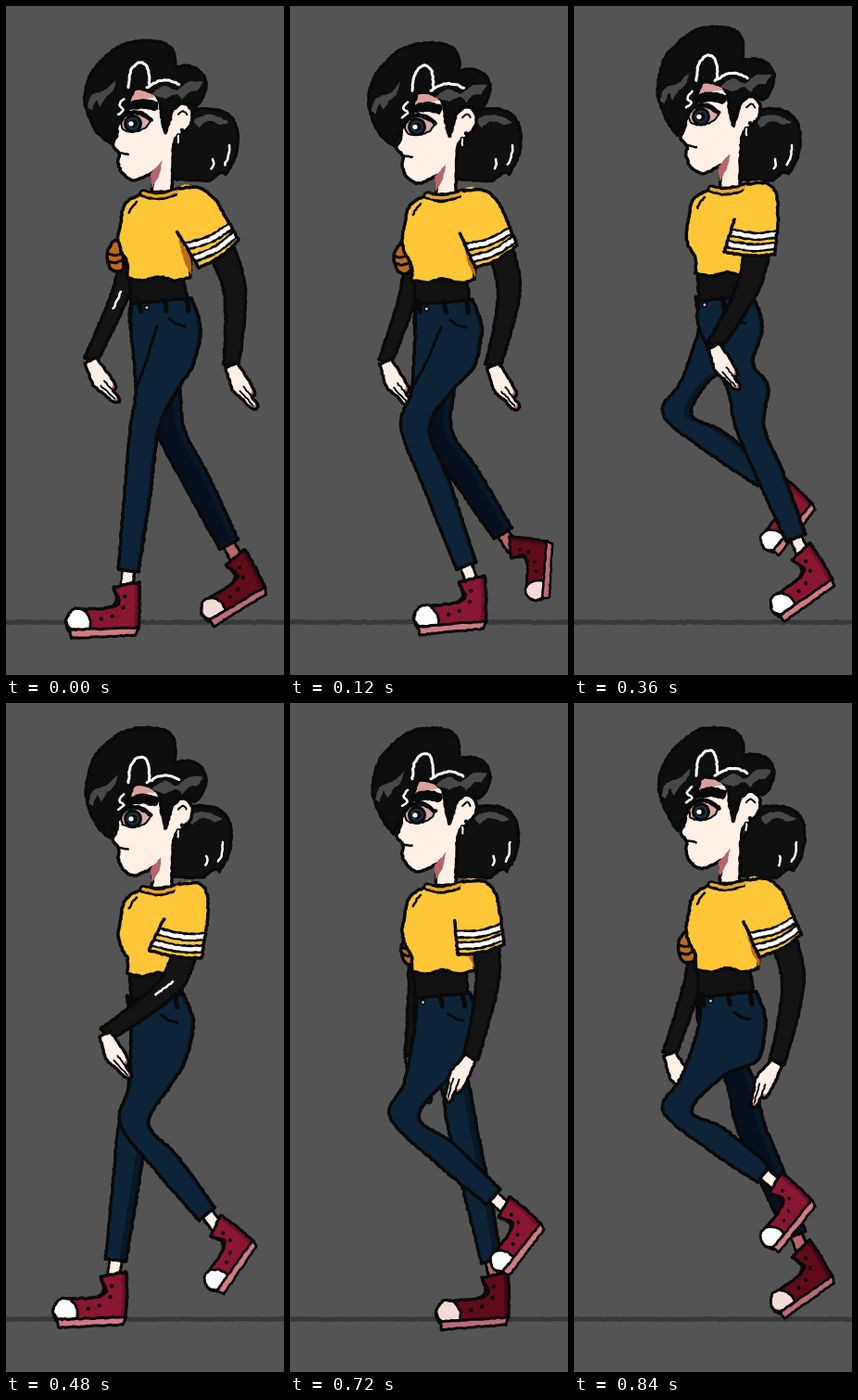
Recreate the animation shown at these times as an HTML page with a canvas. Size 300 px wide and 721 px high, loop 0.96 s.

```html
<!DOCTYPE html>
<html lang="en">
<head>
<meta charset="utf-8">
<title>Walk cycle</title>
<style>
html, body { margin: 0; width: 100%; height: 100%; overflow: hidden; background: #545454; }
canvas { display: block; }
</style>
</head>
<body>
<canvas id="stage" width="300" height="721"></canvas>
<script>
const ctx = document.getElementById('stage').getContext('2d');
const STEP = 120, POSES = 8;
const INK = '#0a0a0a', SKIN = '#fff0e6', PINK = '#b5656b', SHIRT = '#ffc638', RUST = '#bd6a1b', SLEEVE = '#141414';
const JEANS = '#0d2438', JEANS_SHADE = '#081827', JEANS_FAR = '#07101e';
const RED = '#8a1732', RED_SHADE = '#6a1028', RED_FAR = '#5f0b1a', GREY = '#484848';

// One stride, as heel x, heel y, shoe pitch in degrees, knee x.
const stride = [
  [140, 679, -1, 150], [209, 672, -4, 136], [233, 671, -3, 186], [281, 626, -34, 190],
  [271, 586, -54, 139], [256, 577, -50, 124], [275, 568, -51, 124], [261, 543, -50, 112]
];
// The far leg is half a stride behind, reaches further and drags a little.
const farStride = { ...stride, 0: [126, 671, -1, 138], 4: [281, 635, -30, 178], 5: [284, 580, -85, 160] };

let seed = 1;
function noise() {
  seed = (seed * 16807) % 2147483647;
  return seed / 2147483647 - .5;
}

const mix = (a, b, t) => [a[0] + (b[0] - a[0]) * t, a[1] + (b[1] - a[1]) * t];
const hard = ([x, y]) => [x, y, true];
const unit = (a, b) => {
  const d = Math.hypot(b[0] - a[0], b[1] - a[1]);
  return [(b[0] - a[0]) / d, (b[1] - a[1]) / d];
};

// "x,y x,y!" where "!" marks a hard corner.
function parse(text) {
  return text.split(' ').map(t => [...t.split(',').map(parseFloat), t.endsWith('!')]);
}

// Smooth path through the points, with a slightly ragged pen edge.
function curve(source, closed = true) {
  const pts = typeof source === 'string' ? parse(source) : source;
  const n = pts.length, path = new Path2D();
  const at = i => closed ? pts[(i + n) % n] : pts[Math.max(0, Math.min(n - 1, i))];
  const handle = (p, a, b) => p[2] ? p : [p[0] + (b[0] - a[0]) / 6, p[1] + (b[1] - a[1]) / 6];
  path.moveTo(pts[0][0], pts[0][1]);
  for (let i = 0; i < (closed ? n : n - 1); i++) {
    const p = at(i), q = at(i + 1);
    const c = handle(p, at(i - 1), q), d = handle(q, at(i + 2), p);
    const steps = Math.max(1, Math.round(Math.hypot(q[0] - p[0], q[1] - p[1]) / 2.2));
    for (let k = 1; k <= steps; k++) {
      const t = k / steps, u = 1 - t;
      const on = a => u * u * u * p[a] + 3 * u * u * t * c[a] + 3 * u * t * t * d[a] + t * t * t * q[a];
      path.lineTo(on(0) + noise() * 1.2, on(1) + noise() * 1.2);
    }
  }
  if (closed) path.closePath();
  return path;
}

function pen(path, color = INK, width = 3.5) {
  ctx.strokeStyle = color;
  ctx.lineWidth = width;
  ctx.stroke(path);
}

function line(points, color, width) {
  pen(curve(points, false), color, width);
}

function fill(points, color) {
  ctx.fillStyle = color;
  ctx.fill(curve(points));
}

// Outlined shape; a shade shows where the shifted base leaves it bare.
function shape(points, color, width = 3.5, shade = color, dx = 0, dy = 0) {
  const path = curve(points);
  ctx.save();
  ctx.clip(path);
  ctx.fillStyle = shade;
  ctx.fill(path);
  ctx.translate(dx, dy);
  ctx.fillStyle = color;
  ctx.fill(path);
  ctx.restore();
  pen(path, INK, width);
}

function dot(x, y, r, color) {
  ctx.fillStyle = color;
  ctx.beginPath();
  ctx.arc(x, y, r, 0, Math.PI * 2);
  ctx.fill();
}

function placed(x, y, angle, scale, paint) {
  ctx.save();
  ctx.translate(x, y);
  ctx.rotate(angle);
  ctx.scale(scale, scale);
  paint();
  ctx.restore();
}

// Outline of a limb through its joints, with a half width at each.
function taper(joints, widths) {
  const side = sign => joints.map((p, i) => {
    const [ux, uy] = unit(joints[Math.max(0, i - 1)], joints[Math.min(joints.length - 1, i + 1)]);
    const w = widths[i] * sign;
    return [p[0] - uy * w, p[1] + ux * w, i !== 1];
  });
  return [...side(1), ...side(-1).reverse()];
}

function shoe(dark) {
  shape('-23,-53! -8,-56 5,-58! 5,-34 3,-8! -35,-6 -72,-7! -75,-18 -67,-29 -52,-30 -30,-31 -20,-38',
    dark ? RED_FAR : RED, 3.5, dark ? '#460712' : RED_SHADE, -5, -2);
  shape('-70,-8! -75,-18 -67,-30 -56,-29 -49,-19 -49,-8!', dark ? '#f3dcd6' : '#fff', 3);
  shape('-71,-8! 3,-9! 0,-1! -70,1!', dark ? '#bb6d74' : '#cf7c84', 3);
  line('-23,-51 -17,-37 -26,-31', INK, 3);
  for (let k = 0; k < 3; k++) dot(-37 + k * 12, -19 - k * k * 3, 2.3, INK);
  dot(-11, -43, 2.3, INK);
}

// Joints of one leg, worked out from the shoe and the knee.
function legJoints([x, y, pitch, kneeX], bob) {
  const hip = [168, 345 + bob], angle = pitch * Math.PI / 180, scale = 1 + pitch / 500;
  const knee = [kneeX, hip[1] + Math.sqrt(113 ** 2 - (kneeX - hip[0]) ** 2)];
  const c = Math.cos(angle) * scale, s = Math.sin(angle) * scale;
  const collar = [x - 9 * c + 53 * s, y - 9 * s - 53 * c];
  const [ux, uy] = unit(collar, knee);
  return { x, y, pitch, angle, scale, hip, knee, collar, ankle: [collar[0] + ux * 18, collar[1] + uy * 18] };
}

function foot(leg, dark) {
  line([leg.ankle, leg.collar], INK, 16);
  line([leg.ankle, leg.collar], dark ? PINK : SKIN, 10);
  placed(leg.x, leg.y, leg.angle, leg.scale, () => shoe(dark));
}

function trousers({ hip, knee, ankle, pitch }, lean, bob, far, color, shadeWidth) {
  const thigh = mix(hip, knee, .62), calf = mix(knee, ankle, .45);
  const [ux, uy] = unit(knee, ankle);
  const off = (p, w) => [p[0] + uy * w, p[1] - ux * w];
  const back = far ? 14 : 28, seat = far ? -12 : 0;
  const front = [thigh[0] - 17, thigh[1]];
  shape([
    [135, 321 + bob, true], [200 + lean * .7, 315 + bob, true],
    [209 + seat + lean * .6, 340 + bob], [209 + seat + lean * .7, 360 + bob], [201 + seat + lean * .7, 389 + bob],
    [thigh[0] + back, thigh[1]], [knee[0] + 15, knee[1]],
    off(calf, 14), hard(off(ankle, 11)), hard(off(ankle, -11)), off(calf, -14),
    [knee[0] - 16, knee[1]], front, [135, 350 + bob]
  ], color, 3.5, JEANS_SHADE, -shadeWidth, 0);
  if (far) return;
  if (pitch > -10) line([[163, 345 + bob], [(163 + front[0]) / 2, 382 + bob], front], INK, 3);
  placed(lean * .7, bob, 0, 1, () => line('176,337 183,342 193,345', INK, 3));
}

function waistband(lean, bob) {
  placed(lean, bob, 0, 1, () => {
    dot(152, 325, 3.2, INK);
    dot(152, 325, 1.5, '#b9c0c6');
    for (const x of [143, 171, 195]) line([[x, 317], [x + 2, 329]], INK, 5);
  });
}

function hand([x, y], degrees) {
  placed(x, y, -degrees * Math.PI / 180, .95, () => {
    shape('-7,0! -9,14 -10,28 -4,41 1,54 7,57 9,52 7,43 12,40 11,22 7,0!', SKIN, 3.5, PINK, -2, -4);
    line('-3,31 0,40 4,52', INK, 2);
    line('3,28 5,36 7,43', INK, 2);
  });
}

function arm(joints, widths, handAngle, forward) {
  const [, elbow, wrist] = joints;
  shape(taper(joints, widths), SLEEVE);
  hand(wrist, handAngle);
  if (forward > .8) line([elbow, mix(elbow, wrist, .25)], '#fff', 2.5);
}

function farArm(swing, bob) {
  if (swing < -.1) return;
  const wrist = [131 - 40 * swing, 382 + bob * .6];
  arm([[136, 245 + bob], [137 - 13 * swing, 308 + bob], wrist], [10, 9, 7], 15 + 13 * swing, swing);
  placed(127 - 11 * swing, 270 + bob, 0, 1, () => {
    shape('6,-18 -4,-11 -7,2 -1,15 11,12', RUST);
    line('-6,-3 2,-1 10,-4', INK, 3);
    line('-6,5 2,7 10,4', INK, 3);
  });
}

function nearArm(phase, bob) {
  const swing = Math.cos(phase);
  const wrist = [
    185 + 58 * swing - 10 * Math.cos(2 * phase) + 10 * Math.cos(3 * phase),
    377 + 15 * swing - 5 * Math.cos(2 * phase)
  ];
  const elbow = [213 + 33 * swing, 301 + bob * .6];
  arm([[207 + 8 * swing, 230 + bob], elbow, wrist], [16, 12, 8], Math.sin(phase) < -.1 ? -34 : 24, -swing);

  placed(0, bob, 0, 1, () => {
    const pit = [178 + 7 * swing, 239 + 5 * swing], inner = [181 + 27 * swing, 275 + 7 * swing];
    const bend = [227 + 10 * swing, 233 - 5 * swing], outer = [231 + 20 * swing, 264 - 12 * swing];
    const hem = mix(inner, outer, .5);
    const outline = [[187, 197], [208, 196], [221 + 4 * swing, 208], bend, hard(outer), [hem[0] + 2, hem[1] + 3], hard(inner), pit];
    fill(outline, SHIRT);
    ctx.save();
    ctx.clip(curve(outline));
    for (const t of [.4, .75]) {
      const a = mix(pit, inner, t), b = mix(bend, outer, t), m = mix(a, b, .5);
      const band = [a, [m[0] + 2, m[1] + 3], b];
      line(band, INK, 9.5);
      line(band, '#fff', 4.5);
    }
    ctx.restore();
    line(outline, INK, 3.5);
  });
}

function shirt() {
  shape('148,202! 135,208 127,217 124,232 121,250 124,264 131,277 131,293! 148,296 165,292 183,296 199,292! 199,272 196,230 188,199!', SHIRT);
  fill('185,247! 198,267 200,291! 192,274', RUST);
  line('148,202 165,205 188,199', INK, 9);
  line('148,202 165,205 188,199', '#e5a52b', 3.5);
  line('141,211 136,217 133,223', INK, 2.5);
}

function ponytail() {
  shape('198,118 215,113 235,116 247,128 250,148 246,168 237,183! 232,181 220,190! 208,190 192,189 180,186 179,165 184,148', '#101010');
  fill('203,125 220,119 240,127 231,130! 219,126 208,133!', GREY);
  line('241,152 240,164 236,173', '#fff', 2.5);
  line('223,167 224,172 222,177', '#fff', 2.5);
}

function face() {
  shape('118,106 119,125 120,138 115,149 118,154! 122,160 121,169 126,181 138,188 152,183 159,179! 157,205! 179,205! 181,150 190,138 200,126 200,112 190,104 180,110 165,92 130,90', SKIN);
  fill('156,181! 168,167! 165,183 157,196!', PINK);
  fill('131,91 147,88 162,97 150,100 136,103', '#dba09c');
  shape('124,121! 140,116 156,124! 150,132 137,136 126,133', '#d9aaa8', 2);
  dot(137, 127, 10, INK);
  dot(137, 127, 7, '#1c2f40');
  dot(137, 127, 4.5, INK);
  dot(135, 127, 2.6, '#fff');
  line('124,121 132,115 145,115 157,123', INK, 4);
  line('121,158! 132,160!', INK, 2.5);
}

function hair(push, lift) {
  const front = parse('112,147! 98,136 88,115 85,95 92,73 106,56 120,45').map(([x, y, h], i) =>
    [x + (i && push), y + (y < 80 ? lift : 0), h]);
  const crown = parse('138,39 158,38 174,42 182,53').map(([x, y]) => [x, y + lift]);
  const rest = parse('182,66! 198,65 211,72 216,86 210,103 203,109! 190,105 180,112 177,122 172,137! 168,120 166,104 160,95 148,90 138,91 133,104 129,116 121,129');
  shape([...front, ...crown, ...rest], '#0e0e0e');
  fill('128,114! 134,104 148,100 165,104! 162,113 146,111', INK);
  placed(push, 0, 0, 1, () => fill('88,110! 92,97 108,90 119,79! 115,92 108,98! 101,109! 97,101! 92,113!', GREY));
  fill('157,95! 171,86 184,91 197,82 213,82! 206,92! 199,92 190,101! 184,95 172,100!', GREY);
  line('132,88 134,72 140,63 147,61 153,67 155,86', '#fff', 3);
  line('152,88 166,81 178,81 187,85', '#fff', 3);
  line('121,117 127,112 122,107 127,100', '#fff', 2.5);
}

function ear() {
  line('186,117 191,113 195,117', INK, 2);
  dot(190, 134, 2.2, INK);
  line('186,140! 186,147!', INK, 5);
  line('186,140! 186,147!', '#fff', 2);
}

function draw(index) {
  const phase = index * Math.PI * 2 / POSES, swing = Math.cos(phase);
  // The body dips and rises twice per loop, a little higher on the second step.
  const nod = -2.2 + 2 * Math.cos(2 * phase) + 5.5 * Math.sin(2 * phase) - (index < POSES / 2 ? 0 : 2);
  const chest = nod * .65, bob = nod * .4, lean = -12 * Math.sin(phase / 2);
  const near = legJoints(stride[index], bob);
  const far = legJoints(farStride[(index + POSES / 2) % POSES], bob);

  seed = 1234 + index * 977;
  ctx.lineJoin = ctx.lineCap = 'round';
  ctx.fillStyle = '#545454';
  ctx.fillRect(0, 0, 300, 721);
  line('-5,664 150,664 305,664', '#383838', 5);

  farArm(swing, chest);
  foot(far, swing > -.1);
  trousers(far, lean, bob, true, swing > .5 ? JEANS_FAR : JEANS, 8);

  placed(3.5 * swing - 3.5, -2, 0, 1, ponytail);
  placed(0, nod, 0, 1, () => {
    face();
    hair(Math.max(0, -nod) * .7, 4.5 * swing - 4.5);
    ear();
  });

  shape([[133, 286, true], [190, 286, true], [196 + lean * .5, 317 + bob, true], [135, 322 + bob, true]], '#121212');
  foot(near, false);
  trousers(near, lean, bob, false, JEANS, 3);
  waistband(lean, bob);
  placed(0, chest, 0, 1, shirt);
  nearArm(phase, chest);
}

const start = performance.now();
let shown = -1;
function tick() {
  const index = Math.floor((performance.now() - start) / STEP) % POSES;
  if (index !== shown) draw(shown = index);
  requestAnimationFrame(tick);
}
tick();
</script>
</body>
</html>
```
